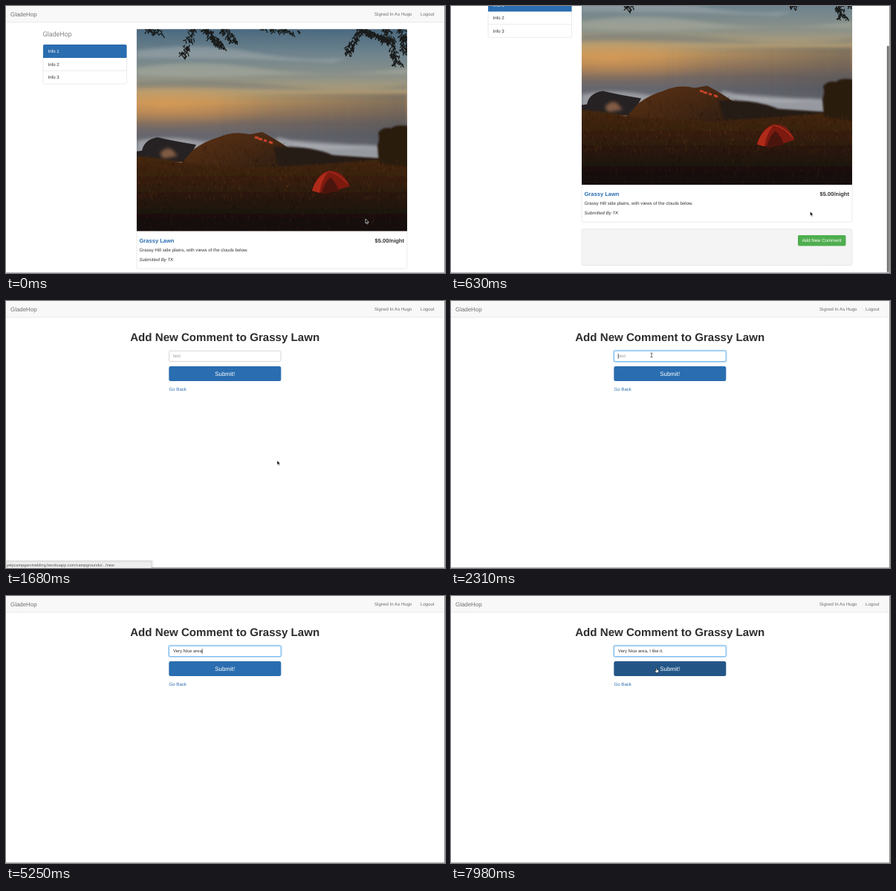
Write an HTML page that moves like this. It is 591 px wide and 360 px high and loops after 8 s.

```html
<!DOCTYPE html>
<html lang="en">
<head>
<meta charset="utf-8">
<title>Camp comment</title>
<style>
html, body { margin: 0; width: 100%; height: 100%; overflow: hidden; background: #fff; }
svg { display: block; }
text { font: 6.1px "Liberation Sans", Arial, sans-serif; fill: #333; white-space: pre; text-rendering: geometricPrecision; }
.nav { fill: #6f6f6f; }
.brand { font-size: 7.9px; }
.light { font: 300 9px Roboto, "Liberation Sans", sans-serif; fill: #484848; }
.h4 { font-size: 7.55px; font-weight: bold; }
.h1 { font-size: 15.1px; font-weight: bold; fill: #2d2d2d; }
.link { fill: #2a6db0; }
.white { fill: #fff; }
.mid { text-anchor: middle; }
.end { text-anchor: end; }
.line { fill: none; stroke: #ddd; stroke-width: .6; }
</style>
</head>
<body>
<svg width="591" height="360" viewBox="0 0 591 360">
  <defs>
    <linearGradient id="sky" x2="0" y2="1">
      <stop offset="0" stop-color="#4a697f"/>
      <stop offset=".2" stop-color="#71858e"/>
      <stop offset=".36" stop-color="#8d9288"/>
      <stop offset=".48" stop-color="#b39d74"/>
      <stop offset=".55" stop-color="#bd945f"/>
      <stop offset=".63" stop-color="#a07d5b"/>
      <stop offset=".71" stop-color="#796a62"/>
      <stop offset=".8" stop-color="#66666d"/>
      <stop offset="1" stop-color="#787e89"/>
    </linearGradient>
    <linearGradient id="dusk">
      <stop offset=".3" stop-color="#4c4f55" stop-opacity="0"/>
      <stop offset="1" stop-color="#4c4f55" stop-opacity=".55"/>
    </linearGradient>
    <radialGradient id="glow">
      <stop offset="0" stop-color="#e8a050" stop-opacity=".55"/>
      <stop offset="1" stop-color="#e09848" stop-opacity="0"/>
    </radialGradient>
    <linearGradient id="field" x2="0" y2="1">
      <stop offset="0" stop-color="#452711"/>
      <stop offset=".35" stop-color="#331d0d"/>
      <stop offset=".7" stop-color="#1d120a"/>
      <stop offset="1" stop-color="#110c09"/>
    </linearGradient>
    <linearGradient id="hill" x2="1" y2=".6">
      <stop offset="0" stop-color="#5a3013"/>
      <stop offset=".5" stop-color="#462813"/>
      <stop offset="1" stop-color="#231a13"/>
    </linearGradient>
    <filter id="soft" x="-20%" y="-60%" width="140%" height="220%"><feGaussianBlur stdDeviation="2.2"/></filter>
    <filter id="edge"><feGaussianBlur stdDeviation=".8"/></filter>
    <clipPath id="frame"><path d="M176 31.3H540V303.6H176Z"/></clipPath>
    <g id="navbar">
      <path d="M0 0H591V22H0Z" fill="#f8f8f8"/>
      <path d="M0 22H591" class="line"/>
      <text x="6" y="14" class="nav brand">GladeHop</text>
      <text x="496" y="13.4" class="nav">Signed In As Hugo</text>
      <text x="558" y="13.4" class="nav">Logout</text>
    </g>
  </defs>

  <g id="camp">
    <use href="#navbar"/>
    <text x="49.5" y="40.5" class="light">GladeHop</text>
    <rect x="50" y="52" width="112.5" height="53" rx="1.7" class="line"/>
    <path d="M50 87.3H162.5" class="line"/>
    <path d="M50 70V53.7Q50 52 51.7 52H160.8Q162.5 52 162.5 53.7V70Z" fill="#2a6db0"/>
    <text x="56.5" y="63.2" class="white">Info 1</text>
    <text x="56.5" y="80.8">Info 2</text>
    <text x="56.5" y="98.4">Info 3</text>

    <rect x="176" y="31.3" width="364" height="322.7" rx="1.7" class="line"/>
    <g clip-path="url(#frame)">
      <path d="M176 31H540V210H176Z" fill="url(#sky)"/>
      <ellipse cx="215" cy="134" rx="150" ry="32" fill="url(#glow)"/>
      <path d="M176 118H540V210H176Z" fill="url(#dusk)" filter="url(#soft)"/>
      <g filter="url(#soft)">
        <path d="M176 60Q260 48 330 62T460 70L440 76Q330 70 176 70Z" fill="#b4bab6" opacity=".4"/>
        <path d="M176 84Q250 70 340 84T540 84L540 92Q420 90 330 94T176 93Z" fill="#b9b9a8" opacity=".4"/>
        <path d="M176 102Q270 96 370 107T540 106V113Q400 114 300 111T176 111Z" fill="#6c7476" opacity=".4"/>
        <path d="M176 182Q210 174 255 181T350 180Q420 182 540 194V206H176Z" fill="#a9abb1" opacity=".75"/>
        <path d="M365 178Q410 194 460 190T540 200" fill="none" stroke="#c0c2c6" stroke-width="3" opacity=".6"/>
      </g>
      <path d="M183 195Q186 180 204 177Q225 182 256 187L244 210H176V196Z" fill="#262223"/>
      <path d="M207 199Q216 188 224 194L231 202L212 206Z" fill="#a87452" opacity=".7" filter="url(#soft)"/>
      <path d="M234 214L252 194Q266 183 286 177Q306 168 328 173L345 170Q364 180 378 190Q394 199 420 204L450 226H234Z" fill="url(#hill)"/>
      <path d="M360 190Q410 188 440 201L510 206V226H370Z" fill="#271c14" filter="url(#edge)"/>
      <path d="M170 202Q220 206 246 212Q320 219 380 216T546 203V310H170Z" fill="url(#field)" filter="url(#edge)"/>
      <path d="M502 212L500 188Q504 179 501 171Q508 162 518 165Q527 158 546 163V218Z" fill="#2b1c10" filter="url(#edge)"/>
      <path d="M335 177l5 1M340 179l5 1M347 181l4 1M354 183l5 2" stroke="#c8432a" stroke-width="3"/>
      <g id="grass" fill="none" stroke-width=".6"></g>
      <path d="M412 249Q416 232 429 224Q439 220 449 225Q459 233 463 243Q440 250 430 253Z" fill="#7d1a10"/>
      <path d="M412 249Q418 229 434 223Q424 236 422 252Z" fill="#b02a19"/>
      <path d="M434 223Q449 226 460 240" fill="none" stroke="#b8301d" stroke-width="1.2"/>
      <path d="M425 253Q428 238 437 231Q446 240 448 250Z" fill="#4a150d"/>
      <path id="leaves" fill="none" stroke="#191b1a" stroke-width="1.3" stroke-linecap="round"/>
    </g>
    <text x="179.5" y="319" class="h4 link">Grassy Lawn</text>
    <text x="536" y="319" class="h4 end">$5.00/night</text>
    <text x="179.5" y="331">Grassy Hill side plains, with views of the clouds below.</text>
    <text x="179.5" y="343.8" style="font-style:italic">Submitted By TK</text>

    <rect x="176" y="363.3" width="364" height="49" rx="1.7" fill="#f4f4f4" stroke="#e0e0e0" stroke-width=".6"/>
    <path d="M184 394.5H532" stroke="#eee" stroke-width=".6"/>
    <rect id="add" x="467" y="371.5" width="64.5" height="14.6" rx="1.7"/>
    <text x="499.2" y="381" class="white mid">Add New Comment</text>
  </g>

  <g id="form">
    <use href="#navbar"/>
    <text x="294.7" y="54" class="h1 mid">Add New Comment to Grassy Lawn</text>
    <rect id="halo" x="218.7" y="66.5" width="152.2" height="15.8" rx="2.5" fill="none" stroke="#bcdcf6" stroke-width="1.4"/>
    <rect id="field-box" x="219.6" y="67.3" width="150.4" height="14.2" rx="1.7" fill="#fff" stroke-width=".8"/>
    <text id="hint" x="225" y="76.4" style="fill:#999">text</text>
    <text id="typed" x="225" y="76.4" style="font-size:5.95px"></text>
    <path id="caret" d="M0 71.2V77.8" stroke="#222" stroke-width=".7"/>
    <rect id="submit" x="219.3" y="88" width="151" height="20" rx="2.5"/>
    <text x="294.7" y="100.6" class="white mid" style="font-size:8px">Submit!</text>
    <text x="219.5" y="121" class="link">Go Back</text>
  </g>

  <rect id="thumb" x="586.8" width="3" rx="1.5" fill="#777"/>
  <path d="M590.5 0V360" stroke="#777" stroke-width=".8"/>
  <path d="M0 359.6H591" stroke="#999" stroke-width=".8"/>
  <g id="status">
    <path d="M0 350.5H196.5V360" fill="none" stroke="#000" stroke-width="2" opacity=".15" filter="url(#edge)"/>
    <path d="M-1 351.3H194Q195.7 351.3 195.7 353V361H-1Z" fill="#eee" stroke="#c4c4c4" stroke-width=".5"/>
    <text x="0.5" y="357.5" style="font-size:5.5px;fill:#555">yelpcampgarvinelding.herokuapp.com/campgrounds/.../new</text>
  </g>

  <g id="pointer">
    <path id="arrow" d="M0 0V6L1.4 4.8 2.4 7 3.4 6.5 2.5 4.5H4.4Z" fill="#000" stroke="#fff" stroke-width=".6"/>
    <path id="hand" d="M-.6 0Q0 -.7 .6 0V2.2Q2.6 2 3.2 3.2V5L2.4 6.6H-.6L-2.3 4Q-2.2 3 -.6 4Z" fill="#fff" stroke="#000" stroke-width=".6"/>
    <path id="beam" d="M-1.4 -3Q0 -3 0 -2Q0 -3 1.4 -3M0 -2V2M-1.4 3Q0 3 0 2Q0 3 1.4 3" fill="none" stroke="#222" stroke-width=".7"/>
  </g>
</svg>
<script>
const $ = id => document.getElementById(id);
const show = (id, on) => $(id).style.display = on ? "" : "none";
const between = (t, a, b) => t >= a && t < b;

let seed = 7;
const rnd = (a, b) => {
  seed = seed * 16807 % 2147483647;
  return a + (b - a) * seed / 2147483647;
};

// Hanging branches: top x, sideways lean, length, needles
const branches = [[186, 22, 7, 30], [252, -14, 38, 60], [268, 22, 26, 90], [292, 16, 18, 60],
  [345, 45, 6, 40], [478, -20, 36, 80], [476, 40, 18, 130], [512, 16, 50, 110], [532, 8, 34, 70]];
$("leaves").setAttribute("d", branches.map(([x, lean, length, n]) =>
  Array.from({length: n}, () => {
    const k = rnd(0, 1);
    return `M${x + lean * k + rnd(-5, 5)} ${30 + k * length + rnd(-3, 2)}l${rnd(-4, 4)} ${rnd(1, 5)}`;
  }).join("")).join(""));

const blades = (color, n, x1, x2, y1, y2) => {
  let d = "";
  for (let i = 0; i < n; i++) d += `M${rnd(x1, x2)} ${rnd(y1, y2)}l${rnd(-2, 2)} ${rnd(-6, -2)}`;
  return `<path d="${d}" stroke="${color}" opacity=".45"/>`;
};
$("grass").innerHTML = blades("#784419", 260, 176, 540, 212, 262) + blades("#4e2e16", 160, 176, 540, 250, 304)
  + blades("#0e0906", 400, 176, 540, 210, 304) + blades("#2a180c", 130, 262, 385, 190, 216);

const message = "Very Nice area, I like it.";
const keyTimes = [2870, 3220, 3360, 3430, 3500, 3780, 3920, 3990, 4200, 4340, 4620, 4830, 5040,
  5250, 5600, 5740, 5950, 6160, 6300, 6440, 6510, 6580, 6720, 6860, 6930, 7140];

const scrollPath = [[70, 0], [210, 24], [350, 48], [490, 60], [630, 62.6], [700, 62.4], [840, 61]];
const pointerPath = [[70, 484, 287], [560, 483.5, 277], [910, 483.5, 277], [1400, 496.5, 318],
  [1470, 496.5, 318], [1680, 365, 215], [2170, 270, 73], [7600, 270, 73], [7910, 276.5, 97]];

function at(path, t) {
  const i = path.findIndex(p => p[0] > t);
  if (i < 0) return path[path.length - 1].slice(1);
  if (!i) return path[0].slice(1);
  const a = path[i - 1], b = path[i], k = (t - a[0]) / (b[0] - a[0]);
  return a.slice(1).map((v, j) => v + (b[j + 1] - v) * k);
}

function draw(t) {
  const onForm = t >= 1610;
  show("camp", !onForm);
  show("form", onForm);

  const [scroll] = at(scrollPath, t);
  $("camp").setAttribute("transform", `translate(0 ${-scroll})`);
  const top = scroll * .855;
  $("thumb").setAttribute("y", top);
  $("thumb").setAttribute("height", Math.min(306, 359 - top));
  show("thumb", between(t, 70, 1400));
  $("thumb").style.opacity = Math.min(1, (1400 - t) / 210);
  $("add").setAttribute("fill", t >= 1400 ? "#398f3c" : "#50ae4f");
  show("status", between(t, 1400, 1960));

  const focused = t >= 2240;
  const count = keyTimes.filter(k => k <= t).length;
  show("halo", focused);
  $("field-box").setAttribute("stroke", focused ? "#66afe9" : "#ccc");
  show("hint", !count);
  $("typed").textContent = message.slice(0, count);
  const end = count ? $("typed").getComputedTextLength() : 0;
  $("caret").setAttribute("transform", `translate(${225.2 + end} 0)`);
  show("caret", focused && !between(t, 2590, 2870) && t < 7630);
  $("submit").setAttribute("fill", t >= 7840 ? "#235687" : "#2a6db0");

  const [x, y] = at(pointerPath, t);
  const hand = between(t, 1330, 1610) || t >= 7840;
  const beam = between(t, 2100, 2870) || between(t, 7600, 7700);
  $("pointer").setAttribute("transform", `translate(${x} ${y})`);
  show("pointer", !between(t, 2870, 7630));
  show("hand", hand);
  show("beam", beam);
  show("arrow", !hand && !beam);
}

const start = performance.now();
function tick() {
  const t = (performance.now() - start) % 8000;
  draw(Math.floor(t / 70) * 70);
  requestAnimationFrame(tick);
}
tick();
</script>
</body>
</html>
```
